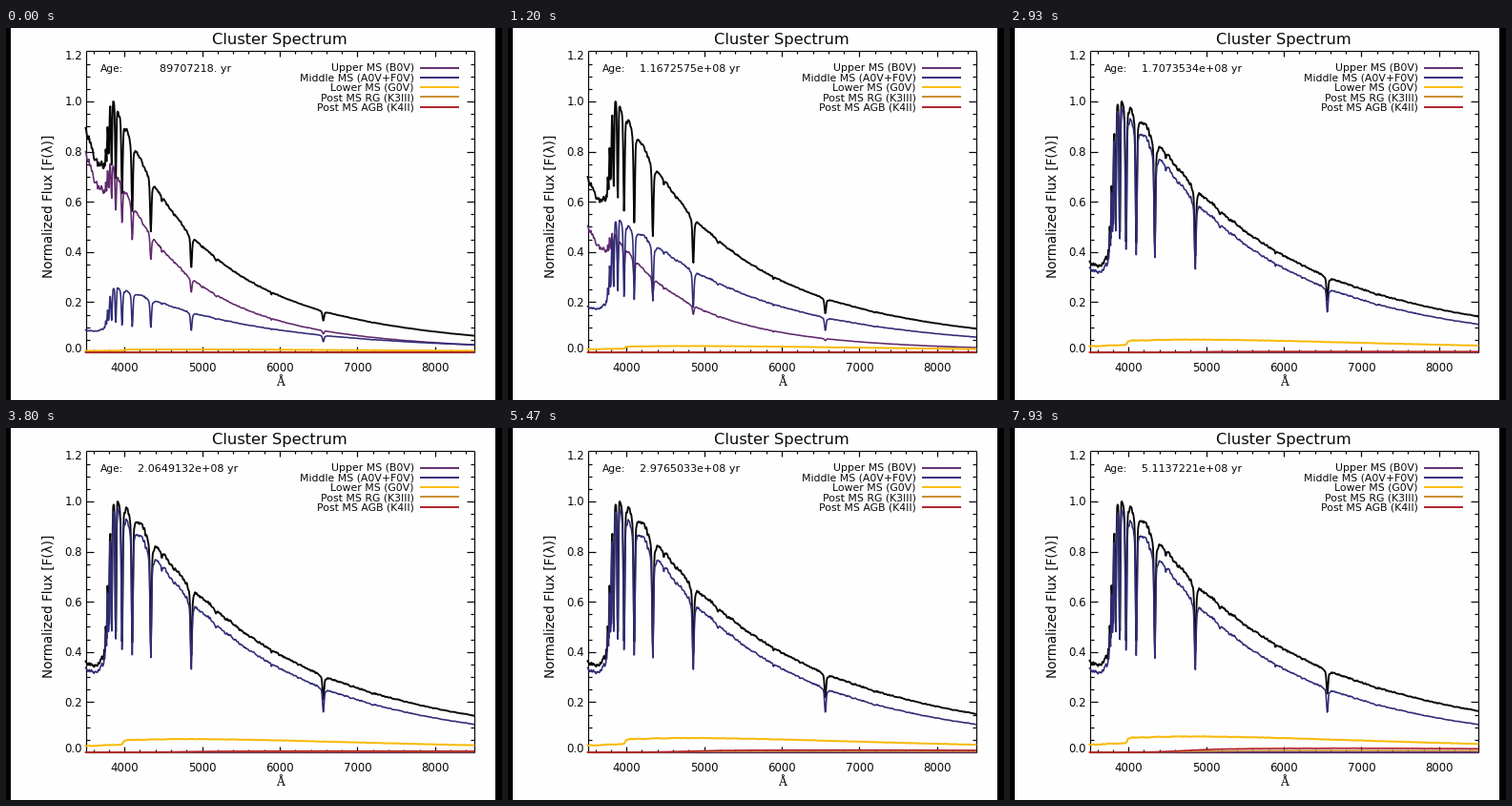
A matplotlib script for the animation above (8 s loop, 520 by 390 pixels).

```python
import numpy as np
import matplotlib.pyplot as plt
from matplotlib.animation import FuncAnimation
from matplotlib.collections import LineCollection
from matplotlib.patches import Rectangle

W, H, DPI = 520, 390, 100
PT = 72 / DPI                      # points per pixel
TICK, LOOP = 20, 8000              # ms
X0, X1, Y0, Y1 = 83.5, 490.5, 340, 24.4
INK = "#080808"
PURPLE, NAVY, YELLOW = "#602a6c", "#302c76", "#f8ba0a"
OCHRE, RED = "#c88a2c", "#b01c28"

fig = plt.figure(figsize=(W / DPI, H / DPI), dpi=DPI, facecolor="#fefefe")
ax = fig.add_axes([0, 0, 1, 1])
ax.set_xlim(0, W)
ax.set_ylim(H, 0)
ax.axis("off")


def px(wave):
    return X0 + (np.asarray(wave) - 3500) * (X1 - X0) / 5000


def py(flux):
    return Y0 - np.asarray(flux) * (Y0 - Y1) / 1.2


def label(x, y, text, size, **kw):
    kw.setdefault("family", "DejaVu Sans")
    return ax.text(x, y, text, fontsize=size * PT, color=INK, **kw)


# Spectral templates
wave = np.arange(3500, 8501, 6.0)
rng = np.random.default_rng(7)


def planck(temp, ref):
    def body(lam):
        return lam ** -5.0 / np.expm1(1.4388e8 / (lam * temp))
    return body(wave) / body(ref)


def step(center, width, low):
    return low + (1 - low) / (1 + np.exp((center - wave) / width))


def dip(center, depth, core, wing=0.0):
    d = wave - center
    shape = (1 - wing) * np.exp(-(d / core) ** 2) + wing / (1 + (d / 30) ** 2)
    return 1 - depth * shape


def balmer(strength):
    out = np.ones_like(wave)
    for k in range(3, 15):
        center = 3645.07 * k * k / (k * k - 4)
        depth = strength * np.exp(-((k - 6.8) / 5.6) ** 2)
        out *= dip(center, depth, 14 - 0.4 * k, 0.2 if k < 8 else 0.07)
    return out


def grain(blue, red):
    soft = np.convolve(rng.normal(size=wave.size), [0.25, 0.5, 0.25], "same")
    return 1 + soft * (red + (blue - red) * np.exp(-(wave - 3500) / 500))


metals = dip(4480, .03, 8) * dip(5180, .025, 14) * dip(5892, .04, 9)

upper = .69 * (wave / 4000) ** -4.1 * step(3750, 25, .70)
upper *= balmer(.24) * metals * grain(.025, .009)

middle = .59 * planck(14500, 5000) * step(3775, 28, .26)
middle *= balmer(.59) * metals * dip(7190, .03, 15) * grain(.022, .008)

lower = planck(6000, 4830) * step(3985, 8, .64) * grain(.06, .015)

post = planck(4300, 6740) * step(4650, 200, 0) * grain(.03, .03)


def fluxes(n):
    grow = (max(n - 31, 0) / 88) ** 1.3
    parts = [
        upper * 3.8 * max(1 - n / 26, 0),
        middle,
        lower * (.045 + .00018 * n),
        post * (.0015 + .006 * grow),
        post * (.002 + .015 * grow),
    ]
    total = sum(parts)
    return [p / total.max() for p in [total] + parts]


# Frame, ticks and lettering
for x, w in ((0, 5), (513, 7)):
    ax.add_patch(Rectangle((x, 0), w, H, color="black", lw=0))

segs = [[(X0, Y0), (X1, Y0)], [(X0, Y1), (X1, Y1)],
        [(X0, Y0), (X0, Y1)], [(X1, Y0), (X1, Y1)]]
for lam in range(3600, 8500, 200):
    x, size = px(lam), 6 if lam % 1000 == 0 else 3
    segs += [[(x, Y0), (x, Y0 - size)], [(x, Y1), (x, Y1 + size)]]
for i in range(1, 24):
    y, size = py(i * .05), 8 if i % 4 == 0 else 4
    segs += [[(X0, y), (X0 + size, y)], [(X1, y), (X1 - size, y)]]
ax.add_collection(LineCollection(segs, colors=INK, linewidths=1.2 * PT))

label(286.5, 17, "Cluster Spectrum", 16.2, ha="center")
label(44.5, 187, "Normalized Flux [F(λ)]", 13.5, rotation=90,
      ha="center", va="center")
label(287.5, 375, "Å", 12, ha="center", family="DejaVu Serif")
for lam in range(4000, 9000, 1000):
    label(px(lam), 359.5, str(lam), 11.8, ha="center")
for i in range(7):
    base = np.clip(py(i * .2) + 4.5, 33, 340.5)
    label(80, base, f"{i * .2:.1f}", 11.8, ha="right")

entries = [("Upper MS (B0V)", PURPLE), ("Middle MS (A0V+F0V)", NAVY),
           ("Lower MS (G0V)", YELLOW), ("Post MS RG (K3III)", OCHRE),
           ("Post MS AGB (K4II)", RED)]
for i, (name, color) in enumerate(entries):
    y = 41.5 + 10.3 * i
    label(428, y + 3.8, name, 10.9, ha="right")
    ax.plot([434, 474.5], [y, y], color=color, lw=1.9 * PT,
            solid_capstyle="butt")

label(99, 45.5, "Age:", 10.6)
age_text = label(138, 45.5, "", 11.1)

styles = [(INK, 1.9), (PURPLE, 1.6), (NAVY, 1.6), (YELLOW, 2.0),
          (OCHRE, 1.5), (RED, 1.6)]
curves = [ax.plot(px(wave), px(wave), color=c, lw=w * PT,
                  solid_joinstyle="round")[0] for c, w in styles]


def update(i):
    n = int((i * TICK + 14) * .015)          # 15 steps per second
    for line, flux in zip(curves, fluxes(n)):
        line.set_ydata(py(flux))
    age = 89707218 * np.exp(.0146264411 * n)
    small = age < 1e8
    age_text.set_text(f"{age:.0f}. yr" if small else f"{age:.7e} yr")
    age_text.set_x(161 if small else 138)
    return curves + [age_text]


anim = FuncAnimation(fig, update, frames=LOOP // TICK, interval=TICK,
                     repeat=True, repeat_delay=0, blit=False)
plt.show()
```
